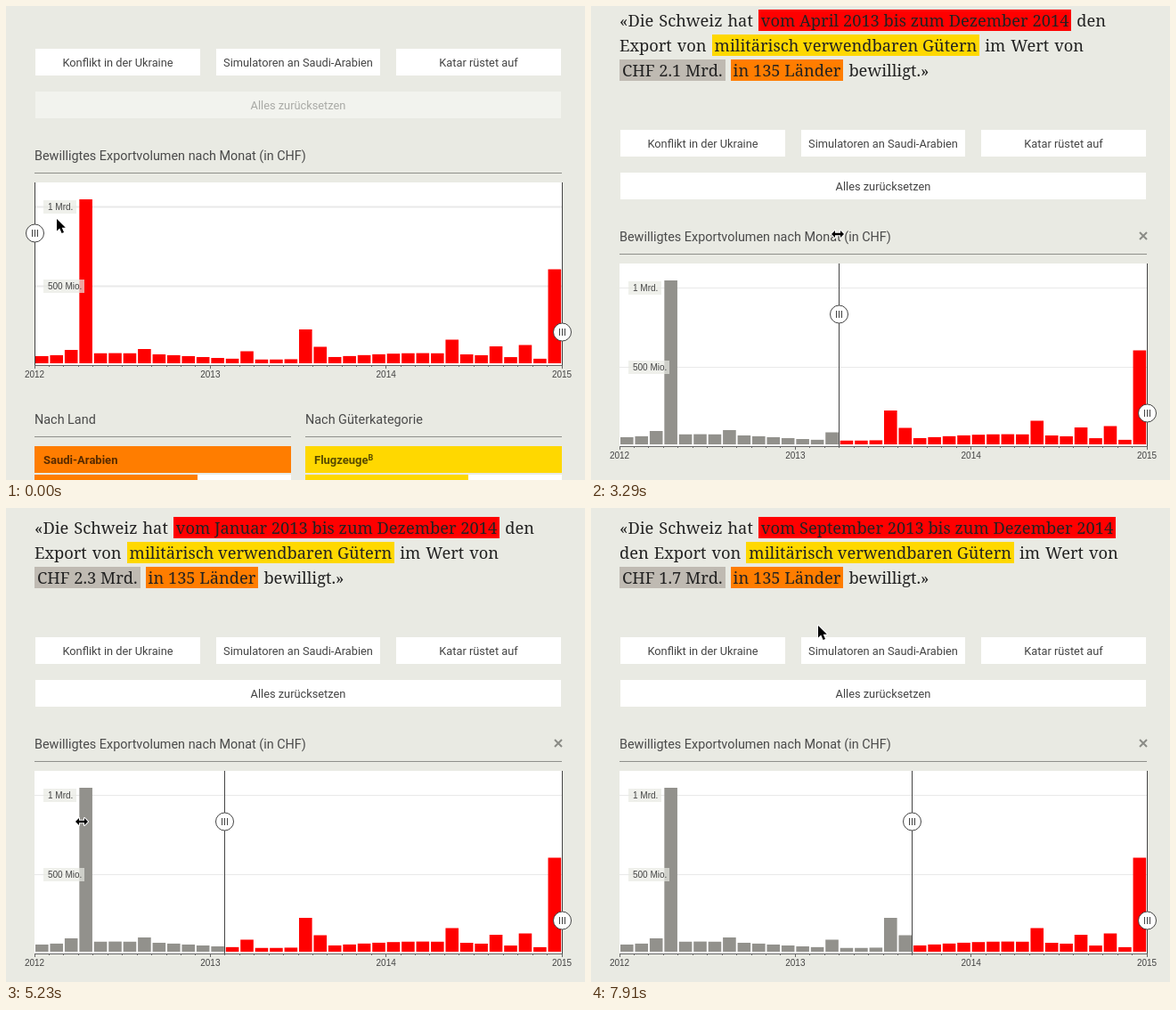
An HTML page that plays this animation: 650x532 px, repeating every 8000 ms.

```html
<!DOCTYPE html>
<html lang="de">
<head>
<meta charset="utf-8">
<title>Exportvolumen</title>
<style>
html, body { margin: 0; width: 100%; height: 100%; overflow: hidden; background: #e9eae3; }
#stage { position: relative; width: 650px; height: 532px; overflow: hidden; background: #e9eae3; }
#page { position: absolute; left: 0; top: 0; width: 650px; height: 650px; }
svg { position: absolute; left: 0; top: 0; overflow: visible; }
#sentence {
  position: absolute; left: 32px; top: 8px; width: 586px; margin: 0;
  font: 18.3px/28px "Noto Serif", serif; word-spacing: 1.2px; color: #222;
}
#sentence span {
  display: inline-block; height: 24px; line-height: 24px;
  padding: 0 3px; white-space: nowrap; word-spacing: 0;
}
.time { background: #f00; }
.goods { background: #ffd800; }
.value { background: #bfbab2; }
.land { background: #ff7d00; }
text { font-family: Roboto, sans-serif; fill: #4a4a4a; }
.title { font-size: 14.4px; }
.btn { font-size: 12.8px; text-anchor: middle; fill: #444; }
.btn.off { fill: #a9aaa6; }
.btn.hover { fill: #111; }
.axis { font: 10px "Liberation Sans", Arial, sans-serif; fill: #444; }
.mid { text-anchor: middle; }
.row { font-size: 13px; font-weight: 600; fill: #000; fill-opacity: .66; }
.cursor path { fill: #000; stroke: #fff; stroke-width: 2; stroke-linejoin: round; paint-order: stroke; }
</style>
</head>
<body>
<div id="stage">
  <div id="page">
    <p id="sentence">«Die Schweiz hat <span class="time"></span> den Export von <span class="goods">militärisch verwendbaren Gütern</span> im Wert von<br><span class="value"></span> <span class="land">in 135 Länder</span> bewilligt.»</p>
    <svg id="art" width="650" height="650"></svg>
  </div>
  <svg class="cursor" width="650" height="532"><path id="pointer"/></svg>
</div>
<script>
const LOOP = 8000, TICK = 149.2;
const LEFT = 32, RIGHT = 624, BASE = 498, COUNT = 36, STEP = (RIGHT - LEFT) / COUNT;
const MONTHS = ['Januar', 'Februar', 'März', 'April', 'Mai', 'Juni', 'Juli',
  'August', 'September', 'Oktober', 'November', 'Dezember'];

// A gentle wave with a few peaks
const peaks = { 2: 15, 3: 184, 7: 16, 14: 13.5, 18: 38, 19: 18.5, 28: 26.5, 31: 19, 33: 20.5, 35: 105.5 };
const heights = Array.from({ length: COUNT }, (_, i) => peaks[i] || 7.8 + 3.6 * Math.cos((i - 5) * .3));

// Pointer legs: start tick, end tick, destination
const legs = [
  [0, 4, 28, 254], [9, 10, 30, 256], [13, 17, 277, 256],
  [26, 29, 291, 370], [29, 32, 278, 352], [33, 38, 32, 352],
  [40, 44, 361, 352], [47, 51, 130, 155], [51, 53, 255, 132]];

const shapes = {
  arrow: 'M0 0V13.5L3.2 10.6L5.6 16L8 15L5.7 9.8H9.8Z',
  resize: 'M-7 0L-3-4V-1.2H3V-4L7 0L3 4V1.2H-3V4Z',
  move: 'M0-7L3-4H1.2V-1.2H4V-3L7 0L4 3V1.2H1.2V4H3L0 7L-3 4H-1.2V1.2H-4V3L-7 0L-4-3V-1.2H-1.2V-4H-3Z'
};

const progress = (t, from, to) => Math.min(1, Math.max(0, (t - from) / (to - from)));
const easeIn = u => u * u;
const easeOut = u => 1 - (1 - u) ** 3;
const smooth = u => u * u * (3 - 2 * u);

const scrollAt = t => Math.round(97 * (1 - smooth(progress(t, 19.85, 22.4))));

// First selected month: dragged to April 2013, back, then to September 2013
const monthAt = t => Math.round(
  15 * (easeIn(progress(t, 13, 17)) - easeIn(progress(t, 33, 38))) +
  20 * easeIn(progress(t, 40, 44)));

function pointerAt(t) {
  let x = 57, y = 239;
  for (const [from, to, toX, toY] of legs) {
    const u = easeOut(progress(t, from, to));
    x += (toX - x) * u;
    y += (toY - y) * u;
  }
  return [Math.round(x), Math.round(y)];
}

const $ = s => document.querySelector(s);
const art = $('#art');

function add(tag, attrs, parent = art) {
  const el = document.createElementNS('http://www.w3.org/2000/svg', tag);
  for (const k in attrs) el.setAttribute(k, attrs[k]);
  parent.append(el);
  return el;
}
const rect = (x, y, width, height, fill) => add('rect', { x, y, width, height, fill });
function label(x, y, cls, str) {
  const el = add('text', { x, y, class: cls });
  el.textContent = str;
  return el;
}
function button(x, y, w, str) {
  return { box: rect(x, y, w, 30, '#fff'), text: label(x + w / 2, y + 19.5, 'btn', str) };
}
function handle(y) {
  const g = add('g', { stroke: '#444', fill: '#fff' });
  add('path', { d: 'M.5 295V500' }, g);
  add('circle', { cx: .5, cy: y, r: 10 }, g);
  add('path', { d: [-2.5, .5, 3.5].map(x => `M${x} ${y - 4}v8`).join('') }, g);
  return g;
}
function list(x, heading, color) {
  label(x, 566, 'title', heading);
  rect(x, 580, 288, 1, '#8f908b');
  rect(x, 591, 288, 30, color);
  rect(x, 623, 288, 27, '#fff');
  return { second: rect(x, 623, 183, 27, color), name: label(x + 10, 611, 'row', '') };
}

const preset = button(33, 145, 185, 'Konflikt in der Ukraine');
button(236, 145, 184, 'Simulatoren an Saudi-Arabien');
button(438, 145, 185, 'Katar rüstet auf');
const reset = button(33, 193, 590, 'Alles zurücksetzen');

label(32, 270, 'title', 'Bewilligtes Exportvolumen nach Monat (in CHF)');
rect(32, 284, 592, 1, '#8f908b');
const clear = add('path', { d: 'M616 260l8 8m0-8l-8 8', stroke: '#8a8b86', 'stroke-width': 2 });

rect(LEFT, 295, RIGHT - LEFT, 205, '#fff');
const grid = add('path', { d: 'M32 322.5H624M32 411.5H624', stroke: '#e9e9e9' });
const bars = heights.map((h, i) => rect(LEFT + 1 + i * STEP, BASE - h, 14.6, h));
for (const [y, w, str] of [[315, 37, '1 Mrd.'], [404, 46, '500 Mio.']]) {
  rect(42, y, w, 15, 'rgba(233,234,227,.7)');
  label(47, y + 11, 'axis', str);
}
rect(LEFT, 500, RIGHT - LEFT + 1, 1, '#666');
for (let i = 0; i <= COUNT; i++) {
  const year = i % 12 === 0, x = LEFT + i * STEP;
  rect(Math.floor(x), 501, 1, year ? 3 : 1, '#666');
  if (year) label(x, 514, 'axis mid', 2012 + i / 12);
}
const start = handle(352);
handle(463).setAttribute('transform', `translate(${RIGHT} 0)`);

const lands = list(32, 'Nach Land', '#ff7d00');
const goods = list(336, 'Nach Güterkategorie', '#ffd800');
goods.name.textContent = 'Flugzeuge';
add('tspan', { dy: -4, 'font-size': 9 }, goods.name).textContent = 'B';

function drawSentence(from) {
  const sum = heights.slice(from).reduce((a, b) => a + b, 0) / 167;
  $('.time').textContent =
    `vom ${MONTHS[from % 12]} ${2012 + Math.floor(from / 12)} bis zum Dezember 2014`;
  $('.value').textContent = `CHF ${sum.toFixed(1)} Mrd.`;
}

function drawChart(first, handleX) {
  bars.forEach((b, i) => b.setAttribute('fill', i < first ? '#92918c' : '#f00'));
  start.setAttribute('transform', `translate(${handleX} 0)`);
  const late = first > 3;
  lands.name.textContent = late ? 'Indien' : 'Saudi-Arabien';
  lands.second.setAttribute('width', late ? 255 : 183);
  goods.second.setAttribute('width', late ? 258 : 183);
}

function drawPointer(tick, handleX) {
  const [x, y] = pointerAt(tick);
  const onChart = tick >= 10 && tick < 48;
  const shape = !onChart ? 'arrow' : x - handleX > 11 ? 'move' : 'resize';
  const p = $('#pointer');
  p.setAttribute('d', shapes[shape]);
  p.setAttribute('transform', `translate(${x} ${y})`);
  const hover = !onChart && x < 218 && y > 145 && y < 175;
  preset.text.classList.toggle('hover', hover);
}

function draw(tick) {
  const first = monthAt(tick), scroll = scrollAt(tick), used = tick >= 14;
  const handleX = Math.floor(LEFT + first * STEP);

  $('#page').style.transform = `translateY(${-scroll}px)`;
  grid.setAttribute('stroke-width', scroll > 50 ? 2 : 1);
  reset.box.setAttribute('fill', used ? '#fff' : '#f2f3ee');
  reset.text.classList.toggle('off', !used);
  clear.style.display = used ? '' : 'none';

  drawSentence(monthAt(tick + .1)); // text runs slightly ahead of the chart
  drawChart(first, handleX);
  drawPointer(tick, handleX);
}

let shown = -1;
function run() {
  const tick = Math.floor((performance.now() % LOOP + 10) / TICK);
  if (tick !== shown) draw(shown = tick);
  requestAnimationFrame(run);
}
run();
</script>
</body>
</html>
```
